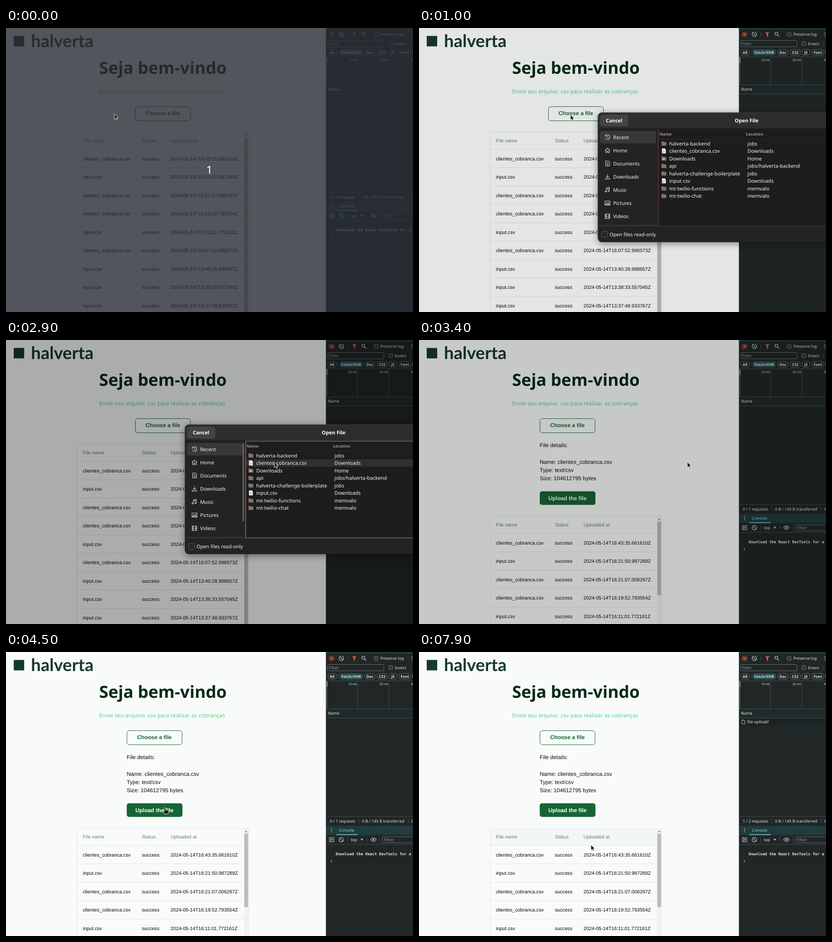
An HTML page for the animation above (8 s loop, 895 by 626 pixels).

```html
<!DOCTYPE html>
<html lang="pt">
<head>
<meta charset="utf-8">
<title>File upload demo</title>
<style>
html, body { margin: 0; width: 100%; height: 100%; overflow: hidden; background: #f9fbfa; }
svg { display: block; width: 895px; height: 626px; text-rendering: geometricPrecision; }
text { white-space: pre; }
.ui { font-family: "Noto Sans", "Open Sans", sans-serif; }
.page { font-family: "Liberation Sans", Arial, sans-serif; }
.mono { font-family: "DejaVu Sans Mono", monospace; }
.logo { font-family: Lato, sans-serif; }
.shadow { filter: blur(8px); }
</style>
</head>
<body>
<svg id="stage" viewBox="0 0 895 626" xmlns="http://www.w3.org/2000/svg"></svg>
<script>
const LOOP = 8000, STEP = 100;
const GREEN = '#166534', MUTED = '#6b7c80', LINE = '#e1e5e4';

// Markup helpers
const text = (x, y, s, size, fill, cls = 'ui', extra = '') =>
  `<text x="${x}" y="${y}" font-size="${size}" fill="${fill}" class="${cls}" ${extra}>${s}</text>`;
const bold = 'font-weight="700" ';
const semi = 'font-weight="600" ';
const mid = 'text-anchor="middle"';
const rect = (x, y, w, h, fill, extra = '') =>
  `<rect x="${x}" y="${y}" width="${w}" height="${h}" fill="${fill}" ${extra}/>`;
const box = (x, y, w, h, stroke, r = 0, fill = 'none', sw = 1, extra = '') =>
  rect(x, y, w, h, fill, `stroke="${stroke}" stroke-width="${sw}" rx="${r}" ${extra}`);
const line = (x1, y1, x2, y2, stroke, w = 1) =>
  `<path d="M${x1} ${y1}L${x2} ${y2}" stroke="${stroke}" stroke-width="${w}"/>`;
const path = (d, stroke, w = 1, fill = 'none') =>
  `<path d="${d}" fill="${fill}" stroke="${stroke}" stroke-width="${w}"/>`;
const group = (id, body) => `<g id="${id}">${body}</g>`;
const at = (x, y, body) => `<g transform="translate(${x} ${y})">${body}</g>`;

// Web page
function pageHead() {
  return rect(0, 0, 704, 626, '#f9fbfa') +
    rect(17, 17.5, 23, 23, '#163a2a') +
    text(55, 41.5, 'halverta', 38, '#163a2a', 'logo', bold) +
    text(345, 101, 'Seja bem-vindo', 36.8, '#042b15', 'ui', bold + mid) +
    text(205, 143.7, 'Envie seu arquivo .csv para realizar as cobranças', 12.2, '#4fd487');
}

function chooseButton() {
  return box(284.5, 173.3, 121.3, 31.2, GREEN, 5.5) +
    text(345, 192.2, 'Choose a file', 12.2, GREEN, 'page', bold + mid);
}

function fileDetails() {
  const lines = [[236, 'File details:'], [272.7, 'Name: clientes_cobranca.csv'],
    [291, 'Type: text/csv'], [309.3, 'Size: 104612795 bytes']];
  return lines.map(([y, s]) => text(265.5, y, s, 12.2, '#0b0f0d', 'page')).join('') +
    rect(265.5, 333.5, 122.5, 30, GREEN, 'rx="5"') +
    text(326.5, 352.5, 'Upload the file', 12.2, '#fff', 'page', bold + mid);
}

function table() {
  const big = 'clientes_cobranca.csv', small = 'input.csv';
  const rows = [
    [big, '16:43:35.661610'], [small, '16:21:50.987289'], [big, '16:21:07.006297'],
    [big, '16:19:52.793554'], [small, '16:11:01.772161'], [big, '16:07:52.996573'],
    [small, '13:40:28.998657'], [small, '13:38:33.557045'], [small, '13:37:48.933767']];
  const cells = (y, fill, list) =>
    [169, 298.7, 361.8].map((x, i) => text(x, y, list[i], 10.69, fill, 'page')).join('');
  let s = box(156, 388.8, 378, 420, LINE, 3) +
    rect(156.5, 389.3, 367, 37, '#f3f6f6', 'id="headHover"') +
    cells(411.3, MUTED, ['File name', 'Status', 'Uploaded at']);
  rows.forEach(([name, time], i) => {
    const y = 426.4 + i * 40.5;
    s += line(156.5, y, 523.5, y, LINE) +
      cells(y + 24.2, '#070a09', [name, 'success', `2024-05-14T${time}Z`]);
  });
  return s + rect(523.5, 389.3, 9.5, 420, '#f0f2f1') +
    path('M525.3 396.8L528.2 393.2L531.1 396.8Z', 'none', 0, '#8b8e8d') +
    rect(524, 400.3, 8.3, 162, '#babdbc', 'id="thumb"');
}

// Developer tools
function devtools() {
  const ink = '#e1e7e5', icon = '#bcc7c5', rule = '#44514f', red = '#ee5a45', teal = '#62c4cd';
  const hr = y => line(704, y, 895, y, rule);
  const sep = (x, y, h = 10) => line(x, y, x, y + h, rule);
  const check = (x, y) => box(x, y, 8, 8, '#7d8987', 1.5, '#2b3332');
  const clear = y => `<circle cx="737.5" cy="${y}" r="5" fill="none" stroke="${icon}" stroke-width="1.2"/>` +
    line(734, y - 3.5, 741, y + 3.5, icon, 1.2);
  const chip = (x, w, s, on) => box(x, 47.3, w, 12.6, on ? '#35575a' : '#66736f', 4, on ? '#2d4b4e' : 'none') +
    text(x + w / 2, 56.8, s, 8.3, on ? '#c3e7e9' : ink, 'ui', semi + mid);
  return rect(703.5, 0, 191.5, 626, '#202726') + rect(703.5, 0, 191.5, 3.5, '#223d3e') +
    `<circle cx="716" cy="14" r="5" fill="none" stroke="${red}" stroke-width="1.2"/>` +
    rect(713.8, 11.8, 4.4, 4.4, red) + clear(14) + sep(751.5, 9) +
    path('M761.5 9.5H770.5L767.2 14V19H764.8V14Z', 'none', 0, red) +
    `<circle cx="785.7" cy="12.5" r="3.2" fill="none" stroke="${icon}" stroke-width="1.3"/>` +
    line(788, 15, 792, 19, icon, 1.5) + check(810, 10) +
    text(823, 17.4, 'Preserve log', 8.9, ink) + check(891.5, 10) +
    box(707.5, 27.5, 123.5, 14, '#687573', 2) + text(710, 37.8, 'Filter', 9.3, '#8e9997') +
    check(842, 30.3) + text(855, 37.8, 'Invert', 8.9, ink) + sep(888.5, 29) +
    chip(708, 18.5, 'All') + sep(730.5, 48.5) + chip(734, 50, 'Fetch/XHR', true) +
    chip(789, 22.5, 'Doc') + chip(816, 22.5, 'CSS') + chip(842.5, 17, 'JS') +
    chip(864, 26, 'Font') + chip(893.5, 30, '') +
    hr(63.5) + sep(773, 64, 61) + sep(842, 64, 61) +
    line(705.5, 64, 705.5, 125, '#51858c') + rect(704.5, 65, 2.5, 12, '#62989f', 'rx="1"') +
    text(771.5, 73.3, '10 ms', 6.8, ink, 'ui', 'text-anchor="end"') +
    text(840.5, 73.3, '20 ms', 6.8, ink, 'ui', 'text-anchor="end"') +
    text(890, 73.3, '30 ms', 6.8, ink) +
    rect(704, 125, 191, 20.5, '#1f2a2a') + hr(125.3) + hr(145.5) +
    text(708, 138, 'Name', 8.9, ink) +
    group('request', rect(704, 146, 191, 15.5, '#1b2424') +
      path('M709.7 150H714.2L716.8 152.6V158.5H709.7ZM714.2 150V152.6H716.8', icon, 0.9) +
      text(721.8, 157.3, 'file-upload/', 8.9, ink)) +
    hr(362.3) + text(712, 375.8, '0 / 1 requests', 8.8, ink, 'ui', 'id="count"') +
    sep(776, 367) + text(783, 375.8, '0 B / 145 B transferred', 8.8, ink) +
    sep(884.5, 367) + text(891, 375.8, '0 B', 8.8, ink) +
    rect(704, 383, 191, 20.5, '#223b3d') +
    [389.3, 392.8, 396.3].map(y => `<circle cx="716" cy="${y}" r="1" fill="${icon}"/>`).join('') +
    text(732.3, 396, 'Console', 9, '#8ed4da') + rect(726, 401.7, 47.5, 1.8, teal) +
    box(711.3, 409.3, 9.4, 9, icon, 0, 'none', 1.1) + line(714, 409, 714, 418, icon) +
    path('M716 411.3L719 413.8L716 416.3Z', 'none', 0, icon) + clear(413.7) + sep(751.5, 409) +
    text(758, 417, 'top', 9, ink) + path('M779.6 411.7H785.4L782.5 416Z', 'none', 0, icon) +
    sep(794, 409) + path('M801.8 413.7Q808 405.5 814.2 413.7Q808 421.9 801.8 413.7Z', icon, 1.1) +
    `<circle cx="808" cy="413.7" r="2" fill="${icon}"/>` + sep(821.5, 409) +
    box(827.5, 407.3, 90, 13, '#687573', 2) + text(831, 417, 'Filter', 9.3, '#8e9997') + hr(424) +
    text(725, 447.6, 'Download the React DevTools for a better', 8.36, ink, 'mono', bold) +
    path('M714 458.3L716.7 461L714 463.7', teal, 1.1);
}

// File chooser
function sideIcon(i) {
  const shapes = [
    'M-4 -3.5A5.2 5.2 0 1 1 -5 1.5M-5 -5V-2.7H-2.5M0 -3V0L2.5 1.5',
    'M-5.5 0L0 -5L5.5 0M-4 -1V5H-1.2V1.5H1.2V5H4V-1',
    'M-4 -5.5H2L4.5 -3V5.5H-4ZM-2 -2H1M-2 0.5H2.5M-2 3H2.5',
    'M0 -5.5V2M-3 -1L0 2.2L3 -1M-5 2.5V5H5V2.5',
    'M-2.5 3.5V-4.5L4 -5.5V2.5M-2.5 -2L4 -3M-2.7 3.6A1.5 1.3 0 1 1 -2.7 3.5M3.8 2.6A1.5 1.3 0 1 1 3.8 2.5',
    'M-5.5 -4.5H5.5V4.5H-5.5ZM-4 3L-1 -1L1 1.5L2.5 0L4.3 3ZM2.2 -2.3H3.4',
    'M-5 -5H5V5H-5ZM-2.8 -5V5M2.8 -5V5M-2.8 0H2.8M-5 -1.7H-2.8M-5 1.7H-2.8M2.8 -1.7H5M2.8 1.7H5'];
  return path(shapes[i], '#d8d8d8', 1.1);
}

function fileIcon(kind) {
  if (kind === 'doc') {
    return path('M-4 -5.5H2L4.5 -3V5.5H-4Z', 'none', 0, '#f0f0f0') +
      path('M-2.3 -1H2.5M-2.3 1H2.5M-2.3 3H1.5', '#8d8d8d', 0.7);
  }
  return path('M-5 -4.5H-1L0 -3.2H5V0H-5Z', 'none', 0, '#a5604d') +
    rect(-5, -2.5, 10.5, 7.2, '#777', 'rx="1"') +
    (kind === 'down' ? path('M0 -1V2.5M-1.7 1L0 2.7L1.7 1', '#eee', 1.1) : '');
}

const rowTop = i => 246.3 + i * 16.5;

function dialog() {
  const ink = '#f6f6f6';
  const places = ['Recent', 'Home', 'Documents', 'Downloads', 'Music', 'Pictures', 'Videos'];
  const files = [
    ['halverta-backend', 'jobs'], ['clientes_cobranca.csv', 'Downloads', 'doc'],
    ['Downloads', 'Home', 'down'], ['api', 'jobs/halverta-backend'],
    ['halverta-challenge-boilerplate', 'jobs'], ['input.csv', 'Downloads', 'doc'],
    ['mt-twilio-functions', 'memvalo'], ['mt-twilio-chat', 'memvalo']];
  let s = rect(393.5, 189.5, 560, 285.5, '#000', 'rx="10" opacity=".45" class="shadow"') +
    rect(393.5, 186.5, 530, 285.5, '#232323', 'rx="10"') +
    path('M393.5 222V196.5Q393.5 186.5 403.5 186.5H900V222Z', 'none', 0, '#2d2d2d') +
    line(403, 187, 895, 187, '#424242') + line(393.5, 222, 895, 222, '#161616') +
    rect(398, 191, 62.5, 26, '#434343', 'rx="5"') +
    text(429, 207.7, 'Cancel', 10.9, '#fff', 'ui', bold + mid) +
    text(720.3, 207.7, 'Open File', 11.1, '#fff', 'ui', bold + mid) +
    rect(398, 227, 123, 27.5, '#393939', 'rx="5"');
  places.forEach((name, i) => {
    const y = 240.7 + i * 29.05;
    s += at(414.5, y, sideIcon(i)) + text(427, y + 4, name, 10.8, ink);
  });
  s += line(398, 434.5, 521, 434.5, '#383838') +
    rect(520.5, 228, 2.6, 172, '#707070', 'rx="1.3" id="sideBar"') +
    rect(526.5, 222.5, 380, 214, '#1d1d1d') + line(526.3, 222.5, 526.3, 436.5, '#754936') +
    text(529, 237.1, 'Name', 8.8, '#969696', 'ui', bold) +
    text(719, 237.1, 'Location', 8.8, '#969696', 'ui', bold) +
    line(527, 245.7, 895, 245.7, '#2c2c2c') +
    rect(528, 0, 370, 16.5, '#303030', 'id="rowHover"');
  files.forEach(([name, place, kind], i) => {
    const y = rowTop(i) + 8.2;
    s += at(538.3, y, fileIcon(kind)) + text(550.2, y + 4, name, 11.05, ink) +
      text(722.3, y + 4, place, 11, ink);
  });
  return s + line(393.5, 436.5, 895, 436.5, '#3c3c3c') +
    box(527.2, 223, 380, 213, '#8b5035', 0, 'none', 1.8, 'id="focus"') +
    box(401.5, 448, 13.5, 13.5, '#5d5d5d', 3, '#272727') +
    text(419, 458.6, 'Open files read-only', 10.8, ink) +
    path('M403.5 472Q393.5 472 393.5 462V196.5Q393.5 186.5 403.5 186.5', '#3a3a3a', 1);
}

// Pointers, both with the hot spot at the origin
const arrow = path('M0 0V12.2L2.9 9.6L4.9 14L7 13.1L5.1 8.8H9Z', '#fff', 0.9, '#1c1c1c');
const hand = path('M-1.6 1Q0 -1.2 1.4 1V4Q3 3 4 4.4Q5.4 3.8 6.2 5.2Q7.8 5 7.8 6.8V10Q7.4 11.5 6.4 14H-1.2' +
  'Q-2.6 11 -4.8 8.6Q-4.8 6.6 -1.6 8.4Z', '#fff', 0.9, '#1c1c1c') +
  path('M1.4 4V7M4 4.6V7M6.2 5.4V7.4', '#fff', 0.6);

const stage = document.getElementById('stage');
stage.innerHTML = pageHead() + group('choose', chooseButton()) + group('details', fileDetails()) +
  group('table', table()) + devtools() + rect(0, 0, 895, 626, '#000', 'id="dim"') +
  group('dialog', dialog()) +
  group('countdown', rect(0, 0, 895, 626, '#282c34', 'opacity=".8"') +
    text(447, 321, '1', 24, '#fff', 'ui', mid)) +
  group('cursor', group('arrow', arrow) + group('hand', hand));

const $ = id => document.getElementById(id);
const show = (id, on) => $(id).setAttribute('display', on ? 'inline' : 'none');
const move = (id, x, y) => $(id).setAttribute('transform', `translate(${x} ${y})`);

// Keys are [time, ...values]
const DIM = [[800, 0], [1000, .085], [1200, .21], [1400, .315], [3300, .315], [3400, .2],
  [3500, .1], [3600, .035], [3700, 0]];
const POINTER = [[400, 238, 189], [800, 333, 191], [1300, 333, 191], [2200, 560, 365],
  [2400, 590, 383], [2900, 590, 269], [4000, 590, 269], [4500, 350, 343], [4800, 348, 357],
  [4900, 348, 357], [5100, 342, 344], [5200, 342, 344], [5300, 342, 343], [6600, 342, 343],
  [7300, 598, 311], [7500, 598, 311], [7900, 378, 425]];
const linear = p => p;
const smooth = p => p * p * (3 - 2 * p);

function sample(keys, t, ease) {
  const i = keys.findIndex(k => k[0] > t);
  if (i === 0) return keys[0].slice(1);
  if (i < 0) return keys[keys.length - 1].slice(1);
  const a = keys[i - 1], b = keys[i];
  const p = ease((t - a[0]) / (b[0] - a[0]));
  return a.slice(1).map((v, n) => v + (b[n + 1] - v) * p);
}

function draw(ms) {
  const t = Math.floor((ms % LOOP) / STEP) * STEP;
  const open = t >= 900 && t < 3400, chosen = t >= 3400;
  const [x, y] = sample(POINTER, t, smooth);
  const within = (l, top, r, b) => x >= l && x <= r && y >= top && y <= b;

  show('countdown', t < 100);
  $('dim').setAttribute('opacity', sample(DIM, t, linear)[0]);

  show('details', chosen);
  move('choose', chosen ? -18.6 : 0, 0);
  move('table', 0, chosen ? 0 : -159);
  $('thumb').setAttribute('height', chosen ? 162 : 400);
  show('headHover', chosen && within(156, 389, 523, 426));

  show('dialog', open);
  show('focus', t >= 1100);
  show('sideBar', t >= 1700);
  const row = Math.floor((y - rowTop(0)) / 16.5);
  show('rowHover', open && x > 527 && row >= 0 && row < 8);
  $('rowHover').setAttribute('y', rowTop(row));

  show('request', t >= 5700);
  $('count').textContent = t >= 5700 ? '1 / 2 requests' : '0 / 1 requests';

  const link = !open && (chosen ? within(266, 334, 388, 364) : within(284, 173, 406, 205));
  show('hand', link);
  show('arrow', !link);
  move('cursor', x, y);
}

const start = performance.now();
function tick() {
  draw(performance.now() - start);
  requestAnimationFrame(tick);
}
tick();
</script>
</body>
</html>
```
